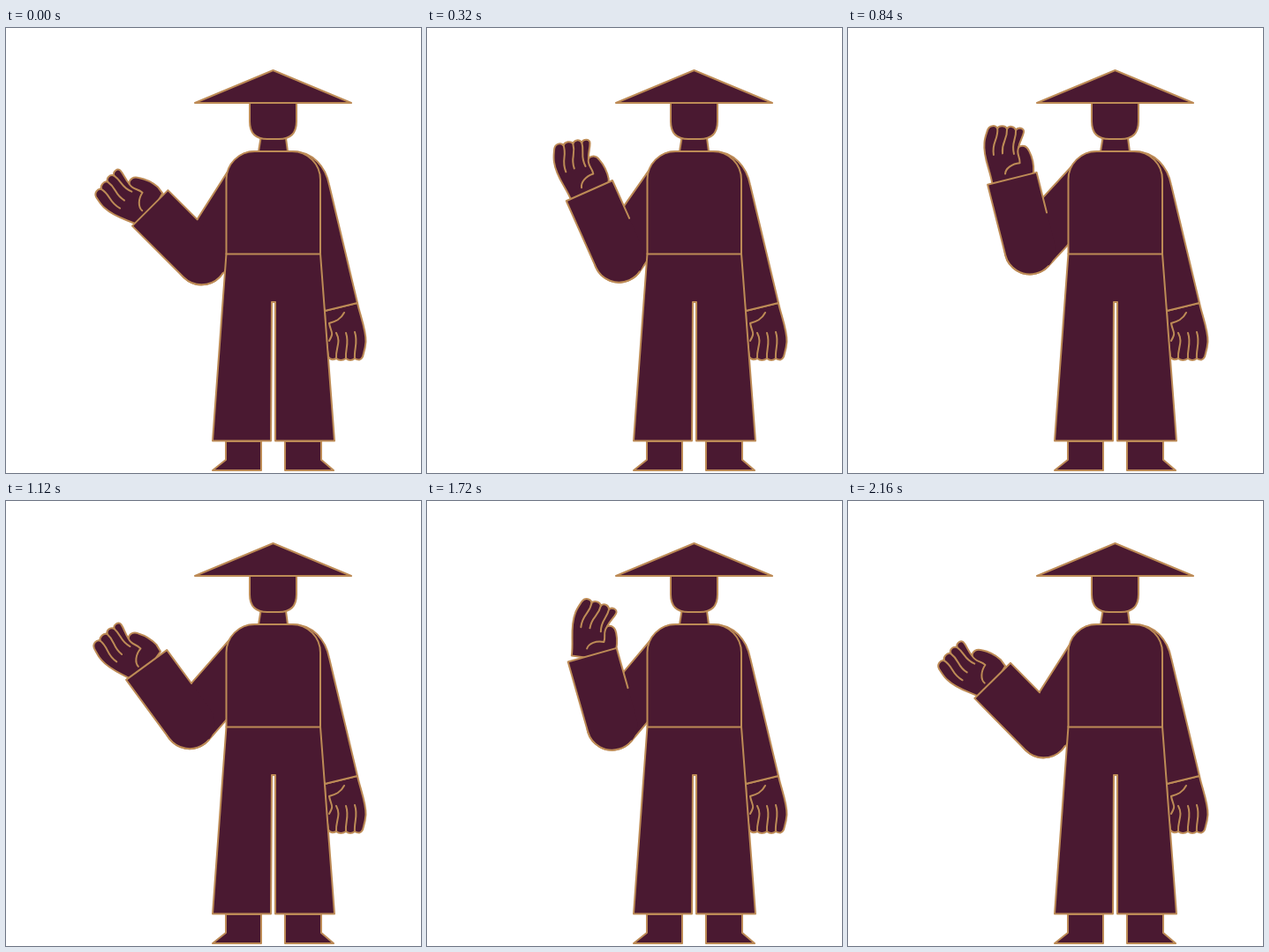
An HTML page with a canvas that plays this animation: 470 px wide and 505 px high, repeating every 2.2 s.

```html
<!DOCTYPE html>
<html lang="en">
<head>
<meta charset="utf-8">
<title>Waving figure</title>
<style>
html, body { margin: 0; width: 100%; height: 100%; overflow: hidden; background: #fff; }
canvas { display: block; }
</style>
</head>
<body>
<canvas id="stage" width="470" height="505"></canvas>
<script>
const ctx = document.getElementById('stage').getContext('2d');
const FILL = '#4a1931', LINE = '#bd8b56';
const STEP = 40, STEPS = 55, RAD = Math.PI / 180;
const SHOULDER = { x: 281, y: 169 };
const UPPER = 111, FORE = 82.5, R = 28.6, SEAM = 47;

// [step, degrees], eased in and out between neighbours
const upperKeys = [[0, 32.4], [4.5, 32.4], [16, 43.8], [26, 41.2], [40, 41], [54, 32.4], [55, 32.4]];
const foreKeys = [[0, 45], [16, 3], [29, 36.8], [42, 15.3], [55, 45]];
const wristKeys = [[0, -5], [16, 31], [28, -7.5], [42.5, 34], [55, -5]];

const body = [
  'M302.5 48 L391 85 H214 Z',
  'M288.5 125 H317 L319 140 H286 Z',
  'M276 85 H329 V106 Q329 126 309 126 H296 Q276 126 276 106 Z',
  'M249 469 H289 V502 H234 L249 490 Z',
  'M316 469 H357 V490 L371 502 H316 Z',
  'M249.5 256 H356 L372 468.5 H305 V311 H301 L300 468.5 H234 Z',
  'M249.5 256.5 V172 A32 32 0 0 1 281.5 140 H324 A32 32 0 0 1 356 172 V256.5 Z'
].map(d => new Path2D(d));

const restHand = new Path2D('M398 312 C401 326 408 343 407.5 356 C407 364 405 369 404 373 ' +
  'Q401 379 395 375 Q390 379 385 375 Q379 379 374 375 Q368 378 365 373 L362 350 L361 321 Z');
const restLines = new Path2D('M374 346 C380 357 373 363 374 375 M385 346 C389 358 384 364 385 375 ' +
  'M395 345 C399 357 394 364 395 375 M383 323 C379 331 373 333 366 335 C368 346 372 345 366 355');
const restArm = new Path2D('M324 140 C348 140 362 158 366 178 L398 312 L361 321 L340 250 Z');

// Waving hand, placed around the middle of the cuff
const hand = new Path2D('M-22 8 C-25 -9 -34 -22 -33 -39 C-33 -45 -31 -50 -30 -54 ' +
  'C-28 -60 -21 -60 -19 -56 C-17 -60 -10 -60 -8 -56 C-6 -60 0 -60 2 -55 ' +
  'C4 -59 12 -58 11 -53 C10 -47 7 -43 6 -36 C10 -39 15 -38 18 -32 C22 -25 24 -18 24 -9 L22 0 Z');
const handLines = new Path2D('M-19 -57 C-17 -43 -25 -41 -22 -26 M-8 -57 C-7 -42 -14 -42 -12 -28 ' +
  'M2 -56 C3 -43 -3 -41 1 -28 M6 -36 C3 -28 8 -26 8 -18 C-1 -17 -8 -11 -8 -5');

function valueAt(keys, s) {
  let i = 1;
  while (i < keys.length - 1 && s > keys[i][0]) i++;
  const [a, from] = keys[i - 1], [b, to] = keys[i];
  const k = (s - a) / (b - a);
  return from + (to - from) * k * k * (3 - 2 * k);
}

function shape(path) {
  ctx.fill(path);
  ctx.stroke(path);
}

function drawArm(s) {
  const a = valueAt(upperKeys, s) * RAD;
  const f = valueAt(foreKeys, s) * RAD;
  const w = valueAt(wristKeys, s) * RAD;
  const ex = SHOULDER.x - UPPER * Math.sin(a), ey = SHOULDER.y + UPPER * Math.cos(a);
  const ux = -Math.sin(f), uy = -Math.cos(f);
  const wx = ex + FORE * ux, wy = ey + FORE * uy;
  // Point on the forearm: distance from elbow, offset to the outer side
  const at = (d, o) => [ex + d * ux + o * uy, ey + d * uy - o * ux];

  ctx.beginPath();
  ctx.arc(SHOULDER.x, SHOULDER.y, R, a + Math.PI, a);
  ctx.arc(ex, ey, R, a, a + Math.PI);
  ctx.closePath();
  ctx.fill();
  ctx.stroke();

  ctx.save();
  ctx.translate(wx, wy);
  ctx.rotate(w - f);
  shape(hand);
  ctx.stroke(handLines);
  ctx.restore();

  ctx.beginPath();
  ctx.moveTo(...at(FORE, -R));
  ctx.lineTo(...at(FORE, R));
  ctx.arc(ex, ey, R, Math.PI - f, -f, true);
  ctx.closePath();
  ctx.fill();

  ctx.beginPath();
  ctx.moveTo(...at(FORE - SEAM, -R));
  ctx.lineTo(...at(FORE, -R));
  ctx.lineTo(...at(FORE, R));
  ctx.arc(ex, ey, R, Math.PI - f, a, true);
  ctx.stroke();
}

function draw(now) {
  const s = Math.floor(now / STEP) % STEPS;
  ctx.fillStyle = '#fff';
  ctx.fillRect(0, 0, 470, 505);
  ctx.fillStyle = FILL;
  ctx.strokeStyle = LINE;
  ctx.lineWidth = 2;
  ctx.lineJoin = ctx.lineCap = 'round';
  drawArm(s);
  shape(restHand);
  ctx.stroke(restLines);
  shape(restArm);
  body.forEach(shape);
}

const start = performance.now();
function tick() {
  draw(performance.now() - start);
  requestAnimationFrame(tick);
}
tick();
</script>
</body>
</html>
```
